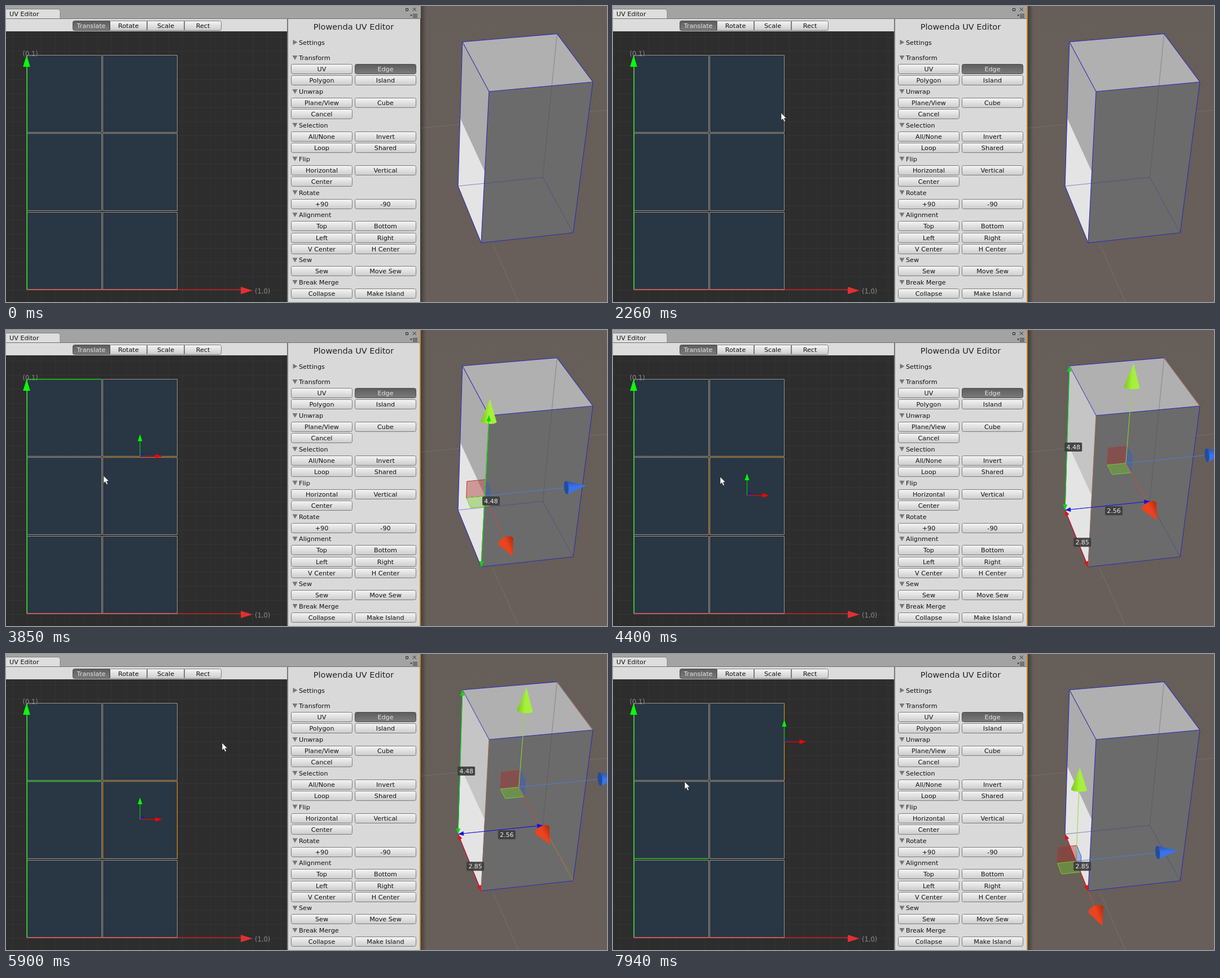
Animation, 1065 px wide and 526 px high, one loop 8000 ms. Source, as an HTML page with a canvas:

```html
<!DOCTYPE html>
<html>
<head>
<meta charset="utf-8">
<style>
html, body { margin: 0; width: 1065px; height: 526px; overflow: hidden; background: #2d2d2d; }
canvas { position: absolute; left: 0; top: 0; }
</style>
</head>
<body>
<canvas id="base" width="1065" height="526"></canvas>
<canvas id="live" width="1065" height="526"></canvas>
<script>
let c = document.getElementById('base').getContext('2d');
const live = document.getElementById('live').getContext('2d');
const FONT = '"DejaVu Sans", sans-serif';

function rect(x, y, w, h, fill) {
  c.fillStyle = fill;
  c.fillRect(x, y, w, h);
}
function line([x1, y1], [x2, y2], color, width = 1) {
  c.strokeStyle = color;
  c.lineWidth = width;
  c.beginPath();
  c.moveTo(x1, y1);
  c.lineTo(x2, y2);
  c.stroke();
}
function poly(points, fill, stroke, width = 1) {
  c.beginPath();
  points.forEach(p => c.lineTo(p[0], p[1]));
  c.closePath();
  if (fill) { c.fillStyle = fill; c.fill(); }
  if (stroke) { c.strokeStyle = stroke; c.lineWidth = width; c.stroke(); }
}
function box(x, y, w, h, radii, fill, stroke) {
  c.beginPath();
  c.roundRect(x, y, w, h, radii);
  c.fillStyle = fill;
  c.fill();
  if (stroke) { c.strokeStyle = stroke; c.lineWidth = 1; c.stroke(); }
}
function text(s, x, y, color = '#111', align = 'left', size = 11.2) {
  c.font = size + 'px ' + FONT;
  c.textAlign = align;
  c.fillStyle = color;
  c.fillText(s, x, y);
}
function blend(x1, y1, x2, y2, ...colors) {
  const g = c.createLinearGradient(x1, y1, x2, y2);
  colors.forEach((color, i) => g.addColorStop(i / (colors.length - 1), color));
  return g;
}
function arrowHead([x, y], angle, color, len = 12, half = 4) {
  c.save();
  c.translate(x, y);
  c.rotate(angle);
  poly([[0, 0], [-len, -half], [-len, half]], color);
  c.restore();
}

// ---- UV pane ----
const ISLAND_W = 132, ISLAND_H = 137;
const islandAt = (col, row) => [37.5 + 134 * col, Math.floor(87 + 139.5 * row) + .5];

// An island edge such as '10L': column, row, side
function uvEdge([col, row, side]) {
  const [x, y] = islandAt(+col, +row), r = x + ISLAND_W, b = y + ISLAND_H;
  return { L: [[x, y], [x, b]], R: [[r, y], [r, b]], T: [[x, y], [r, y]], B: [[x, b], [r, b]] }[side];
}

function drawPane() {
  rect(0, 45, 498, 481, '#2d2d2d');
  for (let x = 12; x < 498; x += 25) rect(x, 45, 1, 481, 'rgba(255,255,255,.03)');
  for (let y = 55; y < 526; y += 25) rect(0, y, 498, 1, 'rgba(255,255,255,.03)');
  for (let i = 0; i < 6; i++)
    box(...islandAt(i % 2, i >> 1), ISLAND_W, ISLAND_H, 0, 'rgba(41,57,72,.82)', '#99938d');
  line([304, 504], [417, 504], '#c92525', 1.5);
  line([37, 504], [304, 504], '#e65a55', 1.5);
  line([37, 504], [37, 106], '#2ce02c', 1.5);
  arrowHead([36.5, 87], -Math.PI / 2, '#0cfa0c', 21, 6.3);
  arrowHead([437, 505.5], 0, '#e23030', 21, 6.5);
  text('(0,1)', 29.5, 89, '#8b8b8b', 'left', 11.5);
  text('(1,0)', 441, 511, '#8b8b8b', 'left', 11.5);
}

// ---- Window frame and tool panel ----
function button(label, x, y, w, on, radii = 3) {
  const fill = on ? blend(0, y, 0, y + 18, '#5c5c5c', '#7c7c7c') : blend(0, y, 0, y + 18, '#f6f6f6', '#cbcbcb');
  box(x + .5, y + .5, w - 1, 17, radii, fill, on ? '#4c4c4c' : '#7b7b7b');
  text(label, x + w / 2, y + 13, on ? '#e6e6e6' : '#111', 'center');
}

const sections = {
  Transform: ['UV', 'Edge', 'Polygon', 'Island'],
  Unwrap: ['Plane/View', 'Cube', 'Cancel'],
  Selection: ['All/None', 'Invert', 'Loop', 'Shared'],
  Flip: ['Horizontal', 'Vertical', 'Center'],
  Rotate: ['+90', '-90'],
  Alignment: ['Top', 'Bottom', 'Left', 'Right', 'V Center', 'H Center'],
  Sew: ['Sew', 'Move Sew'],
  'Break Merge': ['Collapse', 'Make Island']
};

function drawPanels() {
  rect(0, 0, 735, 23, '#a3a3a3');
  box(-4, 5.5, 100, 24, 4, '#dedede', '#818181');
  text('UV Editor', 6, 18);
  rect(0, 22, 735, 1, '#6f6f6f');
  rect(0, 23, 498, 22, '#dcdcdc');
  rect(498, 23, 2, 503, '#777');
  rect(500, 23, 234, 503, '#d9d9d9');
  box(708.5, 4.5, 4, 4, 0, '#a3a3a3', '#222');
  line([720.5, 3], [727, 9], '#333');
  line([727, 3], [720.5, 9], '#333');
  arrowHead([718, 18.5], Math.PI / 2, '#333', 3, 2);
  for (let y = 14; y <= 20; y += 2) rect(721, y, 8, 1, '#444');

  ['Translate', 'Rotate', 'Scale', 'Rect'].forEach((s, i) =>
    button(s, 118 + 66 * i, 26, 66, !i, [!i * 3, (i > 2) * 3, (i > 2) * 3, !i * 3]));

  text('Plowenda UV Editor', 616, 42, '#222', 'center', 14.5);
  arrowHead([516.5, 64.5], 0, '#777', 8, 4.5);
  text('Settings', 519, 69);
  let y = 92;
  for (const [name, labels] of Object.entries(sections)) {
    arrowHead([512, y + 4], Math.PI / 2, '#777', 8, 4.5);
    text(name, 519, Math.round(y) + 4);
    labels.forEach((s, i) =>
      button(s, 505 + 113 * (i % 2), Math.round(y + 11 + 20.4 * (i >> 1)), 109, s === 'Edge'));
    y += 19.5 + 20.2 * Math.ceil(labels.length / 2);
  }
}

// ---- 3D view: box coordinates are [right, up, back], each 0 to 1 ----
const SIZE = [2.56, 4.48, 2.85];
const AXIS_COLOR = ['#1414e0', '#0cd80c', '#e01414'];
const CORNER = [842, 421, 1];
const AXES = [[174.2, -13.5, .0111], [-85.5, -286.7, -.1162], [31.1, -72.2, .09]];

function project(p) {
  const [x, y, w] = CORNER.map((v, i) => v + p.reduce((sum, k, a) => sum + k * AXES[a][i], 0));
  return [x / w, y / w, w];
}
// Corner from a string of bits, such as '011'
const corner = bits => [...bits].map(Number);
const edgeLine = (name, color, width) => line(...name.split('-').map(s => project(corner(s))), color, width);
const face = (names, fill) => poly(names.split(' ').map(s => project(corner(s))), fill);
const upperLeft = fill => poly([[0, 1, 1], [0, 1, 0], [0, .5, 0], [0, .5, 1]].map(project), fill);

function drawView() {
  rect(734, 0, 331, 526, blend(0, 0, 0, 526, '#665e59', '#685f5a'));
  rect(735, 0, 10, 526, blend(735, 0, 745, 0, 'rgba(0,0,0,.35)', 'rgba(0,0,0,0)'));
  rect(733, 0, 2, 526, '#3a3734');
  line([736, 217], [1065, 185], 'rgba(150,150,150,.3)');
  line([862, 422], [908, 526], 'rgba(150,150,150,.3)');
  face('011 111 110 010', '#b0b0b0');
  face('011 010 000 001', '#e4e4e4');
  upperLeft('#acacac');
  face('010 110 100 000', '#6b6b6b');
  edgeLine('111-101', 'rgba(70,70,85,.4)');
  for (const e of ['001-101', '101-100']) edgeLine(e, 'rgba(65,65,145,.58)');
  for (const e of ['011-111', '111-110', '110-010', '010-011', '011-001', '001-000', '010-000', '000-100', '100-110'])
    edgeLine(e, '#2d2db4', 1.1);
}

function cone(base, tip, r, bulge, light, dark, cap) {
  const dx = tip[0] - base[0], dy = tip[1] - base[1];
  c.save();
  c.translate(base[0], base[1]);
  c.rotate(Math.atan2(dy, dx));
  const body = blend(0, -r, 0, r, dark, light, light);
  poly([[0, -r], [Math.hypot(dx, dy), 0], [0, r]], body);
  c.beginPath();
  c.ellipse(0, 0, bulge, r, 0, 0, 7);
  c.fillStyle = cap || body;
  c.fill();
  c.restore();
}
function gizmo(p) {
  const reach = 2.83 * project(p)[2], q = .18;
  const at = (right, up, front) =>
    project([right, up, -front].map((k, i) => p[i] + k * reach / SIZE[i]));
  const o = at(0, 0, 0), side = at(-q, 0, 0), top = at(0, q, 0), front = at(0, 0, q);
  poly([at(-q, q, 0), top, o, side], 'rgba(170,40,35,.4)', '#b03a32');
  poly([top, at(0, q, q), front, o], 'rgba(50,90,200,.4)', '#3a66c8');
  poly([side, o, front, at(-q, 0, q)], 'rgba(115,195,40,.42)', '#7ac83c');
  const up = at(0, .78, 0), right = at(.8, 0, 0), near = at(0, 0, .77);
  line(o, up, '#8fdc30');
  line(o, right, '#4a80d8');
  line(o, near, '#d84a30');
  cone(up, at(0, 1, 0), 14, 4, '#a5f03c', '#7cc41e');
  cone(right, at(1, 0, 0), 12, 4, '#3a74e6', '#2450b4', '#234c9c');
  cone(near, at(0, 0, 1), 14, 8, '#e84420', '#b82808');
}
function dimension(from, to, axis) {
  const a = project(from), b = project(to), color = AXIS_COLOR[axis];
  const angle = Math.atan2(b[1] - a[1], b[0] - a[0]);
  line(a, b, color, 1.2);
  arrowHead(b, angle, color, 10, 4);
  arrowHead(a, angle + Math.PI, color, 10, 4);
  const [x, y] = project(from.map((v, i) => (v + to[i]) / 2));
  box(x - 4.5, y + 1, 31, 16, 2, 'rgba(62,62,62,.94)');
  text(SIZE[axis].toFixed(2), x + 11, y + 13, '#eee', 'center', 11);
}

// ---- Selection ----
const bounds = points => points[0].map((_, i) => {
  const v = points.map(p => p[i]);
  return [Math.min(...v), Math.max(...v)];
});
const middle = range => range.map(([a, b]) => (a + b) / 2);

// Each one lasts until the next
const selections = [
  { from: 0 },
  { from: 810, picked: ['10L'], shared: '02T', edges: ['010-011'] },
  { from: 2150 },
  { from: 2940, picked: ['10B'], shared: '00T', edges: ['010-000'] },
  { from: 3980, picked: ['10B', '11L'], edges: ['010-000', '110-111'] },
  { from: 4830, picked: ['10B', '11L', '11R'], shared: '01T', edges: ['010-000', '110-111', '100-101'] },
  { from: 6020 },
  { from: 7040, picked: ['10R'], shared: '01B', edges: ['001-000'] }
];

function drawUvSelection({ picked, shared }, hot) {
  if (shared) line(...uvEdge(shared), '#1fd01f', 1.4);
  const lines = picked.map(uvEdge);
  lines.forEach(e => line(...e, '#d8921f', 1.2));
  const [x, y] = middle(bounds(lines.flat()));
  const red = hot ? '#fff000' : '#f00';
  rect(x + 1, y - 6, 6, 5, '#16279c');
  line([x, y], [x, y - 28], '#0c0', 1.2);
  arrowHead([x, y - 39], -Math.PI / 2, '#0f0');
  line([x, y], [x + 27, y], red, 1.2);
  arrowHead([x + 39, y], 0, red);
}
function drawBoxSelection({ edges }) {
  const range = bounds(edges.flatMap(e => e.split('-').map(corner)));
  const spans = [0, 1, 2].filter(i => range[i][0] < range[i][1]);
  c.save();
  c.beginPath();
  c.rect(735, 0, 330, 526);
  c.clip();
  if (spans.length > 2) upperLeft('rgba(255,255,255,.3)');
  edges.forEach(e => edgeLine(e, 'rgba(216,146,31,.6)', 1.3));
  gizmo(middle(range));
  const start = [range[0][0], range[1][0], range[2][1]];
  for (const i of spans) {
    const end = [...start];
    end[i] = range[i][0] + range[i][1] - start[i];
    dimension(start, end, i);
  }
  c.restore();
}

// ---- Pointer: start, end, x, y, sag ----
const moves = [
  [50, 640, 172, 158], [850, 1000, 187, 163], [1080, 1240, 230, 223], [1380, 1600, 237, 228],
  [2020, 2260, 298, 190], [2400, 2750, 263, 223], [2940, 3530, 213, 252], [3760, 3850, 173, 259],
  [4270, 4860, 305, 273], [5120, 5750, 383, 158], [5960, 6150, 304, 140], [7040, 7740, 127, 227, 115]
];
function pointerAt(t) {
  let x = 1009, y = -15;
  for (const [start, end, tx, ty, sag = 0] of moves) {
    const k = Math.min(1, Math.max(0, (t - start) / (end - start)));
    const ease = k * k * (3 - 2 * k);
    x += (tx - x) * ease;
    y += (ty - y) * ease + sag * Math.sin(Math.PI * ease);
  }
  return [x, y];
}

function draw(t) {
  c.clearRect(0, 0, 1065, 526);
  if (t >= 810) rect(733, 0, 2, 526, '#c8862a');
  const current = selections.findLast(s => t >= s.from);
  if (current.picked) {
    drawUvSelection(current, t > 860 && t < 1060);
    drawBoxSelection(current);
  }
  c.save();
  c.translate(...pointerAt(t).map(Math.round));
  poly([[0, 0], [0, 13], [3, 10.4], [5.2, 15.5], [7.4, 14.5], [5.2, 9.6], [9.2, 9.4]],
    '#fff', 'rgba(20,20,20,.7)', .7);
  c.restore();
}

drawPane();
drawView();
drawPanels();
c = live;
const begin = performance.now();
function tick() {
  draw((performance.now() - begin) % 8000);
  requestAnimationFrame(tick);
}
tick();
</script>
</body>
</html>
```
